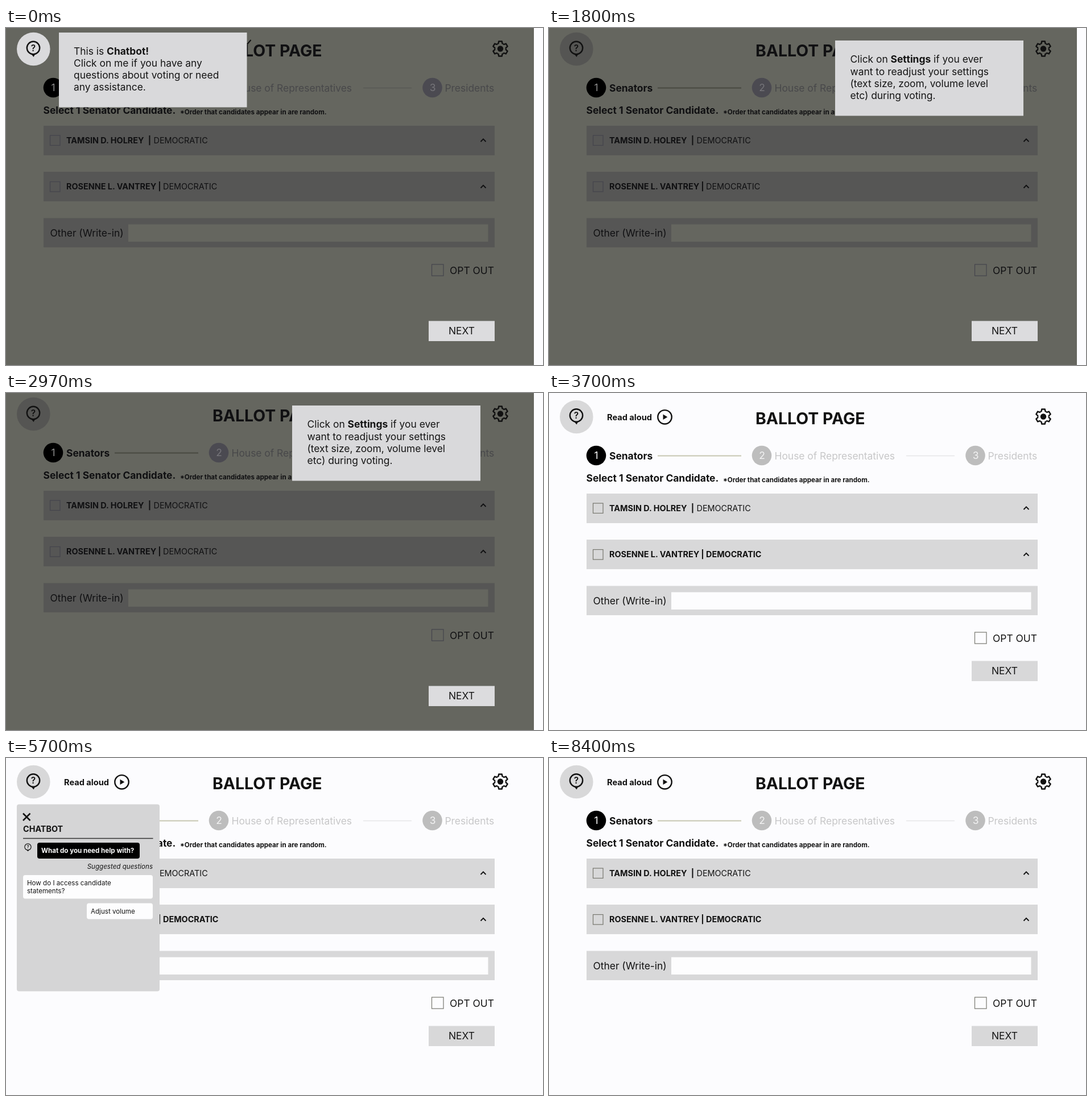
An HTML page that plays this animation: 944 by 593 pixels, repeating every 8.43 s.

```html
<!DOCTYPE html>
<html lang="en">
<head>
<meta charset="utf-8">
<title>Ballot page walkthrough</title>
<style>
  html, body { margin: 0; width: 100%; height: 100%; overflow: hidden; background: #fcfcfe; }
  svg { display: block; width: 944px; height: 593px; font: 17.4px Inter, sans-serif; }
  .b { font-weight: 700; }
  .m { font-size: 14.4px; }
  .s { font-size: 11.6px; }
  .mid { text-anchor: middle; }
  .line { fill: none; stroke: #111; stroke-width: 2.4; stroke-linejoin: round; }

  .light {
    --ink: #121212; --bar: #d8d8d9; --field: #fdfdfe; --box: #77776f;
    --badge: #bdbdbd; --num: #f4f4f4; --faint: #c7c7c8;
    --rule: #c8c8b2; --rule2: #e5e5e6; --one: #fff;
  }
  .dim {
    --ink: #101012; --bar: #565655; --field: #65665f; --box: #44444c;
    --badge: #4b4a51; --num: #77767b; --faint: #48484a;
    --rule: #484941; --rule2: #585955; --one: #8b8b8b;
  }

  .tip1, .tip2, .dim, .light, .chat, .reply {
    visibility: hidden;
    animation: 8430ms step-end infinite;
  }
  .dim   { animation-name: dim; }
  .light { animation-name: light; }
  .tip1  { animation-name: tip1; }
  .tip2  { animation-name: tip2; }
  .chat  { animation-name: chat; }
  .reply { animation-name: reply; }
  @keyframes dim   { 0% { visibility: visible } 43.89%, 100% { visibility: hidden } }
  @keyframes light { 0% { visibility: hidden } 43.89%, 100% { visibility: visible } }
  @keyframes tip1  { 0% { visibility: visible } 19.81%, 100% { visibility: hidden } }
  @keyframes tip2  { 0% { visibility: hidden } 19.81% { visibility: visible } 43.89%, 100% { visibility: hidden } }
  @keyframes chat  { 0% { visibility: hidden } 62.87% { visibility: visible } 92.53%, 100% { visibility: hidden } }
  @keyframes reply { 0% { visibility: hidden } 73.55% { visibility: visible } 92.53%, 100% { visibility: hidden } }
</style>
</head>
<body>
<svg viewBox="0 0 944 593">
  <defs>
    <path id="tooth" d="M-4.85-8.4L-3.4-9.4L-2.8-13H2.8L3.4-9.4L4.85-8.4"/>
    <g id="gear">
      <g class="line">
        <use href="#tooth"/>
        <use href="#tooth" transform="rotate(60)"/>
        <use href="#tooth" transform="rotate(120)"/>
        <use href="#tooth" transform="rotate(180)"/>
        <use href="#tooth" transform="rotate(240)"/>
        <use href="#tooth" transform="rotate(300)"/>
      </g>
      <circle r="5.2" fill="#111"/>
    </g>
    <g id="bot">
      <circle r="11.2" class="line"/>
      <path d="M-4 10.5L0.500 16L3.500 10.500Z" fill="#111"/>
      <text class="mid" y="5.500" font-size="15.500" font-weight="600" fill="#111">?</text>
    </g>
    <path id="chevron" d="M834.500 205L839 200.300L843.500 205" fill="none" stroke-width="1.900"/>
    <path id="speaker" d="M0-2.500H3.500L8-6V6L3.500 2.500H0Z" fill="none" stroke="#111" stroke-width="1.500" stroke-linejoin="round"/>

    <!-- Shared form; colours come from the .light / .dim variables -->
    <g id="page" fill="var(--ink)">
      <text class="b" x="363" y="54.700" font-size="28.400">BALLOT PAGE</text>
      <use href="#gear" x="869" y="41.500"/>

      <circle cx="83" cy="110" r="17.300" fill="#000"/>
      <text class="mid" x="83" y="116" fill="var(--one)">1</text>
      <text class="b" x="106" y="117">Senators</text>
      <path d="M191 110.500H338" stroke="var(--rule)" stroke-width="2"/>
      <g fill="var(--badge)">
        <circle cx="374" cy="110" r="17.300"/>
        <circle cx="749.500" cy="110" r="17.300"/>
      </g>
      <g class="mid" fill="var(--num)">
        <text x="374.500" y="116">2</text>
        <text x="750" y="116">3</text>
      </g>
      <g fill="var(--faint)">
        <text x="396.500" y="117">House of Representatives</text>
        <text x="771.500" y="117">Presidents</text>
      </g>
      <path d="M628 110.500H713" stroke="var(--rule2)" stroke-width="1.500"/>

      <text class="b" x="65.500" y="156.300">Select 1 Senator Candidate.</text>
      <text class="b s" x="306" y="156.700">*Order that candidates appear in are random.</text>

      <g fill="var(--bar)">
        <rect x="66" y="177" width="793" height="52"/>
        <rect x="66" y="258" width="793" height="52"/>
        <rect x="66" y="339.500" width="793" height="51.500"/>
      </g>
      <rect x="215" y="350.500" width="632.500" height="30.500" fill="var(--field)"/>
      <g fill="none" stroke="var(--box)" stroke-width="1.200">
        <rect x="77.500" y="194" width="17.500" height="17.500"/>
        <rect x="77.500" y="275.500" width="17.500" height="17.500"/>
        <rect x="748.500" y="421" width="20.500" height="20"/>
      </g>
      <g class="m">
        <text class="b" x="106" y="207.500">TAMSIN D. HOLREY</text>
        <text class="b mid" x="252.500" y="207.500">|</text>
        <text x="259.500" y="207.500">DEMOCRATIC</text>
        <text class="b" x="106" y="289">ROSENNE L. VANTREY</text>
        <text class="b mid" x="270" y="289">|</text>
      </g>
      <g stroke="var(--ink)">
        <use href="#chevron"/>
        <use href="#chevron" y="81.500"/>
      </g>
      <text x="77.500" y="371.500">Other (Write-in)</text>
      <text x="780" y="437.500">OPT OUT</text>
    </g>

    <g id="next">
      <rect x="743" y="471.500" width="116" height="35.500"/>
      <text class="mid" x="801" y="495" fill="#151515">NEXT</text>
    </g>
  </defs>

  <g class="dim">
    <rect width="928" height="593" fill="#65665f"/>
    <g transform="translate(0 -5)">
      <use href="#page"/>
      <text class="m" x="276" y="289" fill="var(--ink)">DEMOCRATIC</text>
      <circle cx="48.300" cy="42" r="29.300" fill="#555553"/>
    </g>
    <use href="#next" y="44" fill="#dcdcde"/>
  </g>

  <g class="tip1">
    <circle cx="48.300" cy="37" r="29.300" fill="#dadadc"/>
    <rect x="93" y="8" width="330.500" height="131.500" fill="#d9d9db"/>
    <path d="M430.500 21L424 28.500" stroke="#111" stroke-width="2"/>
    <g fill="#151515">
      <text x="119" y="46.700">This is <tspan class="b">Chatbot!</tspan></text>
      <text x="119" y="68">Click on me if you have any</text>
      <text x="119" y="89">questions about voting or need</text>
      <text x="119" y="110.300">any assistance.</text>
    </g>
  </g>

  <g class="tip2">
    <rect x="503" y="22" width="331" height="132.500" fill="#d9d9db"/>
    <g fill="#151515">
      <text x="529.500" y="61.300">Click on <tspan class="b">Settings</tspan> if you ever</text>
      <text x="529.500" y="82.500">want to readjust your settings</text>
      <text x="529.500" y="103.700">(text size, zoom, volume level</text>
      <text x="529.500" y="125">etc) during voting.</text>
    </g>
  </g>

  <g class="dim"><use href="#bot" x="48" y="35"/></g>

  <g class="light">
    <use href="#page"/>
    <text class="b m" x="276" y="289" fill="var(--ink)">DEMOCRATIC</text>
    <use href="#next" fill="#d8d8d9"/>
    <circle cx="48.300" cy="42" r="29.300" fill="#d8d8d9"/>
    <use href="#bot" x="48" y="39.500"/>
    <text class="b" x="102" y="47.500" font-size="14.600" fill="#121212">Read aloud</text>
    <circle class="line" cx="203.500" cy="42.300" r="12.200"/>
    <path d="M200.500 37.500V47L208.300 42.300Z" fill="#111"/>
  </g>

  <g class="chat" fill="#151515">
    <rect x="19" y="81.500" width="251" height="329" rx="4" fill="#d5d5d6"/>
    <path d="M30 97.500L42.500 110M42.500 97.500L30 110" stroke="#111" stroke-width="2.500"/>
    <text class="b m" x="30" y="130.300">CHATBOT</text>
    <path d="M30 141.500H258.500" stroke="#333" stroke-width="1.600"/>
    <use href="#bot" transform="translate(38.500 156.500) scale(.5)"/>
    <rect x="55" y="149" width="180" height="28" rx="4" fill="#000"/>
    <rect x="30" y="206" width="228" height="41.500" rx="4" fill="#fdfdfe"/>
    <rect x="142" y="255.500" width="116" height="28" rx="4" fill="#fdfdfe"/>
    <g class="s">
      <text class="b" x="62" y="167" fill="#fff">What do you need help with?</text>
      <text x="258" y="195" text-anchor="end" font-style="italic">Suggested questions</text>
      <text x="37" y="223.500">How do I access candidate</text>
      <text x="37" y="237.500">statements?</text>
      <text x="149" y="273.500">Adjust volume</text>
    </g>
  </g>

  <g class="reply">
    <rect x="142" y="291" width="116" height="28" rx="4" fill="#646460"/>
    <use href="#bot" transform="translate(38.500 334) scale(.5)"/>
    <rect x="55" y="326.500" width="203.500" height="41.500" rx="4" fill="#000"/>
    <g class="s" fill="#fff">
      <text x="149" y="309" fill="#e8e8e8">Adjust volume</text>
      <text class="b" x="62" y="344.700">Okay, here is the volume</text>
      <text class="b" x="62" y="358.700">adjuster</text>
    </g>
    <use href="#speaker" x="31" y="384.500"/>
    <use href="#speaker" x="229.500" y="384.500"/>
    <g fill="none" stroke="#111" stroke-width="1.600">
      <path d="M42 382L47.500 387.500M47.500 382L42 387.500"/>
      <path d="M240 381.500Q242.500 384.500 240 387.500M243 379Q248 384.500 243 390"/>
      <path d="M57.500 384.500H70M206 384.500H218.500M212.200 378.300V390.700"/>
    </g>
    <path d="M79.500 384.500H97.500M104.300 384.500H122.300" stroke="#0a0a0a" stroke-width="18"/>
    <path d="M129 384.500H147M153.800 384.500H171.800M178.500 384.500H196.500" stroke="#656562" stroke-width="18"/>
  </g>
</svg>
</body>
</html>
```
